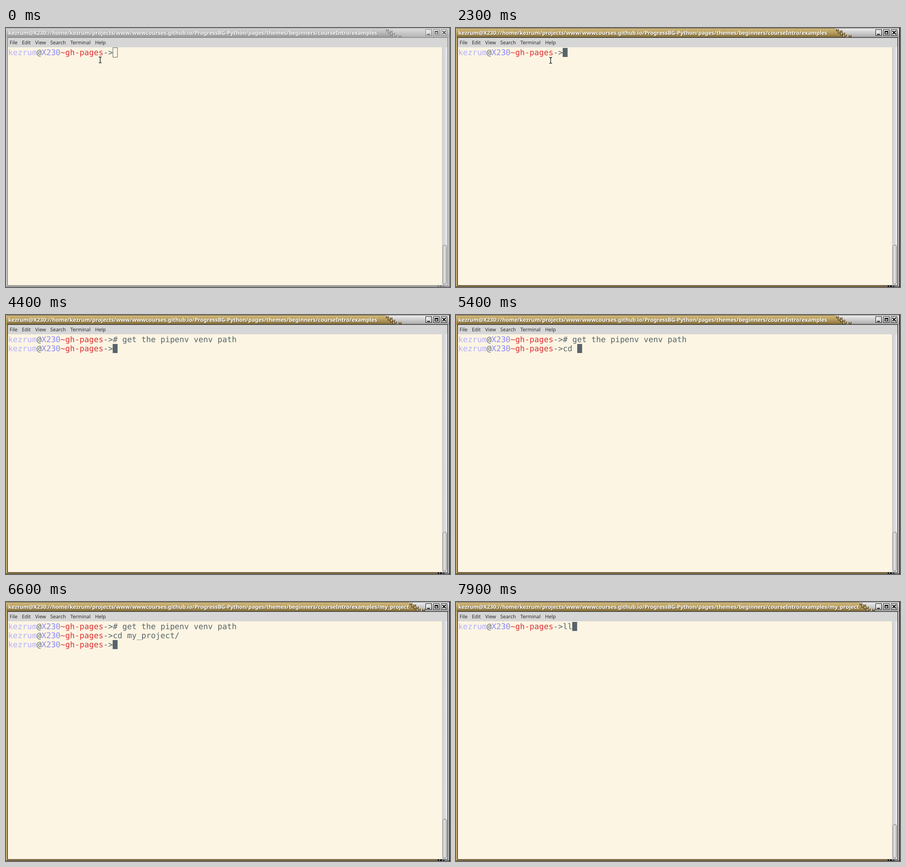
Animation, 978 px wide and 572 px high, one loop 8000 ms. Source, as an HTML page:

```html
<!DOCTYPE html>
<html lang="en">
<head>
<meta charset="utf-8">
<title>Terminal</title>
<style>
  html, body { margin: 0; width: 100%; height: 100%; overflow: hidden; background: #fdf5e3; }
  svg { display: block; width: 978px; height: 572px; }
  text { white-space: pre; text-rendering: geometricPrecision; }

  #win {
    --hi: #d6d6d6; --mid: #b9b9b9; --lo: #999; --edge: #6a6a6a;
    --line: #777; --ink: #555; --cube: #b4b4b4; --shade: #777; --label: #f7f7f7;
    --s1: #dedede; --s2: #b4b4b4;
  }
  #win.active {
    --hi: #d3bc80; --mid: #b79c5c; --lo: #86703c; --edge: #2a2413;
    --line: #111; --ink: #000; --cube: #b3955a; --shade: #40341a; --label: #fff;
    --s1: #f1f1f1; --s2: #a9a9a9;
  }
  .hi { stop-color: var(--hi); }
  .mid { stop-color: var(--mid); }
  .lo { stop-color: var(--lo); }
  .s1 { stop-color: var(--s1); }
  .s2 { stop-color: var(--s2); }
  .line { fill: var(--line); }
  .bar { font: bold 11.84px "Noto Sans", "Open Sans", sans-serif; }
  .menu { font: 10.9px "Noto Sans", "Open Sans", sans-serif; fill: #2c2c2c; }
  .term { font: 17.41px "DejaVu Sans Mono", monospace; fill: #58656a; }
  .user { fill: #b4b0fb; }
  .host { fill: #8888fb; }
  .branch { fill: #d93236; }
</style>
</head>
<body>
<svg id="win" viewBox="0 0 978 572">
  <defs>
    <linearGradient id="barFill" x2="0" y2="1">
      <stop class="hi" offset="0"/><stop class="mid" offset=".5"/><stop class="lo" offset="1"/>
    </linearGradient>
    <linearGradient id="silver" x2="0" y2="1">
      <stop class="s1" offset="0"/><stop class="s2" offset="1"/>
    </linearGradient>
    <linearGradient id="button" x2="1" y2="1">
      <stop offset="0" stop-color="#f6f6f6"/><stop offset="1" stop-color="#c6c6c6"/>
    </linearGradient>
    <linearGradient id="track">
      <stop offset="0" stop-color="#cbcbcb"/><stop offset=".5" stop-color="#dcdcdf"/><stop offset="1" stop-color="#ebebee"/>
    </linearGradient>
    <linearGradient id="thumbFill">
      <stop offset="0" stop-color="#e8e8e8"/><stop offset="1" stop-color="#cacaca"/>
    </linearGradient>
    <clipPath id="barClip"><rect width="923" height="21"/></clipPath>
  </defs>

  <rect width="978" height="572" style="fill:var(--mid)"/>
  <rect x="973" width="5" height="572" fill="#d4d4d4"/>
  <rect x="952" y="568" width="26" height="4" fill="#c0c0c0"/>
  <rect width="978" height="21" fill="url(#silver)"/>

  <g clip-path="url(#barClip)"><g id="cascade"></g></g>
  <g id="title" class="bar"></g>
  <g id="buttons"></g>

  <rect class="line" width="978" height="1" opacity=".55"/>
  <rect width="1" height="572" style="fill:var(--hi)"/>
  <rect class="line" x="976.3" width="1.7" height="572"/>
  <rect class="line" y="571" width="978" height="1"/>
  <rect class="line" x="3" y="20.3" width="970.7" height="548.7"/>
  <g class="line">
    <rect x="951" y="569" width="3" height="2"/><rect x="956" y="569" width="4" height="2"/>
    <rect x="962" y="570" width="4" height="1"/>
  </g>

  <rect x="4" y="21.5" width="968.5" height="21.5" fill="#d6d6d6"/>
  <g id="menu" class="menu"></g>
  <rect x="4" y="42.5" width="957" height="525.5" fill="#fdf5e3"/>
  <rect x="960.5" y="42.5" width="12" height="525.5" fill="url(#track)"/>
  <rect id="thumb" x="962.5" width="8" rx="3.5" fill="url(#thumbFill)" stroke="#777"/>

  <g id="rows" class="term"></g>
  <rect id="cursor"/>
  <g id="pointer" fill="none" stroke-linecap="round"></g>
</svg>

<script>
const LOOP = 8000;
const CELL = 10.48, LEFT = 4.8, TOP = 44, PITCH = 20, PROMPT = 22;
const PATH = "kezrum@X230://home/kezrum/projects/www/wwwcourses.github.io/" +
  "ProgressBG-Python/pages/themes/beginners/courseIntro/examples";
const NOTE = "# get the pipenv venv path";
const CD = "cd my_project/";

// Each step lists only what changes.
const steps = [
  { t: 0, active: false, sub: "", lines: [""], cursor: "hollow", pointer: [207, 70], thumb: 479 },
  { t: 200, pointer: [207, 71] },
  { t: 300, pointer: [208, 71] },
  { t: 2300, active: true, cursor: "solid" },
  { t: 3000, lines: ["#"], pointer: null },
  { t: 3300, lines: ["# "] },
  { t: 3400, pointer: [208, 71] },
  { t: 3700, lines: [NOTE] },
  { t: 4100, cursor: "off" },
  { t: 4400, lines: [NOTE, ""], cursor: "solid", pointer: null },
  { t: 5000, cursor: "off" },
  { t: 5300, lines: [NOTE, "cd"], cursor: "solid" },
  { t: 5400, lines: [NOTE, "cd "] },
  { t: 5700, lines: [NOTE, "cd m"] },
  { t: 5900, lines: [NOTE, "cd my"] },
  { t: 6100, lines: [NOTE, CD] },
  { t: 6600, lines: [NOTE, CD, ""], sub: "/my_project" },
  { t: 7200, cursor: "off" },
  { t: 7400, lines: [""], cursor: "solid", thumb: 491 },
  { t: 7700, lines: ["l"] },
  { t: 7900, lines: ["ll"] }
];
const states = [];
steps.forEach((s, i) => states.push({ ...states[i - 1], ...s }));

const $ = id => document.getElementById(id);
const set = (el, attrs) => {
  for (const k in attrs) el.setAttribute(k, attrs[k]);
  return el;
};
const add = (parent, tag, attrs, text) => {
  const el = set(document.createElementNS("http://www.w3.org/2000/svg", tag), attrs);
  if (text !== undefined) el.textContent = text;
  parent.append(el);
  return el;
};

// Title bar: coloured part with a stepped right edge and loose cubes.
const cascade = $("cascade");
add(cascade, "path", {
  d: "M-900 0H836V4H840V8H844V12H848V16H853V21H-900Z", fill: "url(#barFill)"
});
[[837, 2], [845, 5], [841, 7], [851, 10], [846, 11], [855, 14], [851, 16], [865, 15]].forEach(([x, y]) => {
  add(cascade, "rect", { x, y, width: 6, height: 5, style: "fill:var(--shade)" });
  add(cascade, "rect", { x: x + 1, y, width: 4, height: 4, style: "fill:var(--cube)" });
  add(cascade, "rect", { x: x + 1, y, width: 4, height: 1, style: "fill:var(--hi)" });
});
const labels = [["var(--edge)", 1], ["var(--label)", 0]].map(([fill, d]) =>
  add($("title"), "text", { x: 5 + d, y: 14.8 + d, style: `fill:${fill}`, opacity: d ? 0.55 : 1 }));

const icons = [
  "M4 10.5H10V12.5H4Z",
  "M3.5 4H11.5V11.5H3.5ZM5 7V10H10V7Z",
  "M3 4.5L4.5 3L7.5 6L10.5 3L12 4.5L9 7.5L12 10.5L10.5 12L7.5 9L4.5 12L3 10.5L6 7.5Z"
];
icons.forEach((d, i) => {
  const g = add($("buttons"), "g", { transform: `translate(${924.5 + i * 17} 3.5)` });
  add(g, "rect", { width: 13, height: 13, fill: "url(#button)", style: "stroke:var(--line)" });
  add(g, "path", { d, transform: "translate(-1 -1)", "fill-rule": "evenodd", style: "fill:var(--ink)" });
});

[["File", 8], ["Edit", 34.9], ["View", 64.3], ["Search", 97.6], ["Terminal", 141.7], ["Help", 196.2]]
  .forEach(([name, x]) => add($("menu"), "text", { x, y: 36 }, name));

const rows = [0, 1, 2].map(i => {
  const row = add($("rows"), "text", { x: LEFT, y: TOP + 15.9 + i * PITCH });
  [["user", "kezrum"], ["", "@"], ["host", "X230"], ["branch", "~gh-pages"], ["", "->"]]
    .forEach(([cls, s]) => add(row, "tspan", { class: cls }, s));
  return { row, typed: add(row, "tspan", {}) };
});

// I-beam: light halo under a dark stroke.
const beam = "M-2.5 -6.5Q-.5 -6.5 0 -5.5Q.5 -6.5 2.5 -6.5M0 -5.5V5.5M-2.5 6.5Q-.5 6.5 0 5.5Q.5 6.5 2.5 6.5";
[["#fffdf6", 3], ["#000", 1.3]].forEach(([stroke, w]) =>
  add($("pointer"), "path", { d: beam, stroke, "stroke-width": w }));

function drawCursor(kind, lines) {
  const last = lines.length - 1;
  const x = Math.round(LEFT + CELL * (PROMPT + lines[last].length));
  const y = TOP + last * PITCH;
  const hollow = kind === "hollow";
  set($("cursor"), {
    x: hollow ? x + 0.5 : x, y: hollow ? y - 0.5 : y,
    width: hollow ? 10 : 10.8, height: hollow ? 21 : 20,
    fill: hollow ? "none" : "#58656a",
    stroke: hollow ? "#58656a" : "none",
    visibility: kind === "off" ? "hidden" : "visible"
  });
}

function draw(s) {
  $("win").classList.toggle("active", s.active);
  labels.forEach(l => { l.textContent = PATH + s.sub; });
  set(cascade, { transform: `translate(${s.sub ? 52 : 0} 0)` });
  rows.forEach(({ row, typed }, i) => {
    set(row, { visibility: i < s.lines.length ? "visible" : "hidden" });
    typed.textContent = s.lines[i] || "";
  });
  drawCursor(s.cursor, s.lines);
  set($("thumb"), { y: s.thumb + 0.5, height: 565 - s.thumb });
  set($("pointer"), { visibility: s.pointer ? "visible" : "hidden" });
  if (s.pointer) {
    const [x, y] = s.pointer;
    set($("pointer"), { transform: `translate(${x + 0.5} ${y + 0.5})` });
  }
}

let shown;
function tick() {
  const t = performance.now() % LOOP;
  const state = states.findLast(s => s.t <= t);
  if (state !== shown) draw(shown = state);
  requestAnimationFrame(tick);
}
tick();
</script>
</body>
</html>
```
